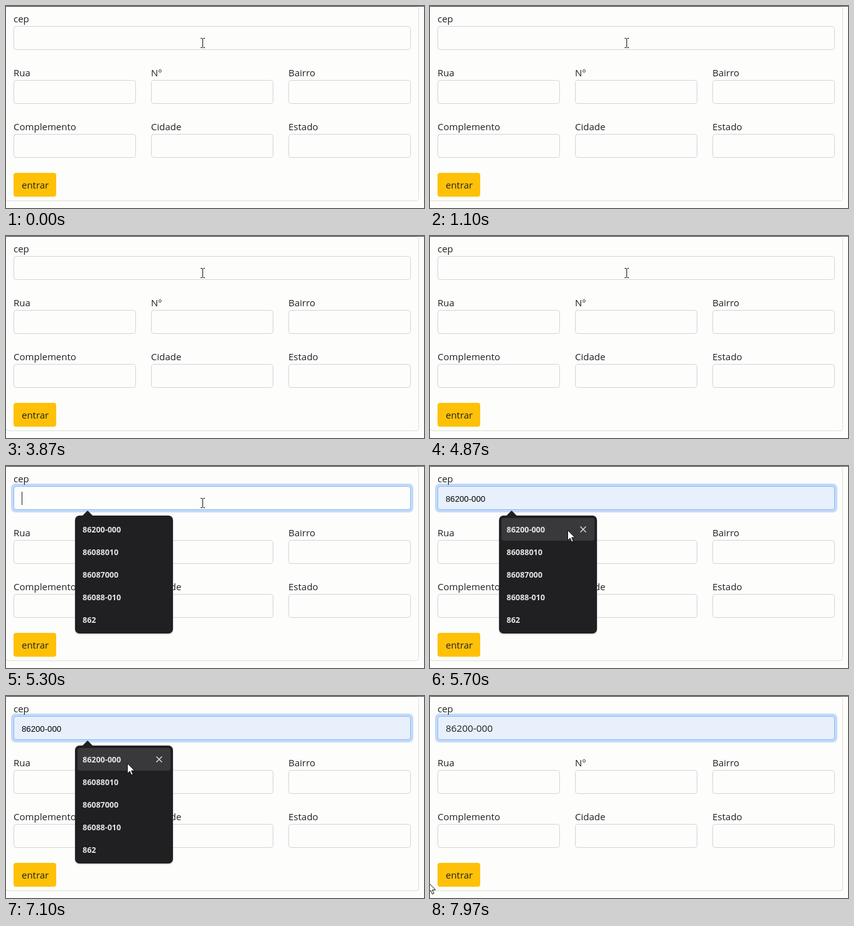
An HTML page that plays this animation: 666x322 px, repeating every 8 s.

```html
<!DOCTYPE html>
<html lang="pt">
<head>
<meta charset="utf-8">
<style>
  html, body { margin: 0; width: 100%; height: 100%; overflow: hidden; background: #fdfdfb; }
  svg { display: block; font: 15px "Open Sans", "Noto Sans", sans-serif; fill: #1e2022; }
  .box { fill: #fdfdfc; stroke: #d2d4da; }
  .card { stroke: #dfdfd6; }
  .ring { fill: #c3dafa; }
  .focus .main { stroke: #8cb8f0; }
  .filled .main { fill: #e7f0fb; }
  #preview { font: 13.2px "Liberation Sans", Arial, sans-serif; fill: #000; }
  #popup { fill: #202022; filter: drop-shadow(0 1px 1px #8888); }
  #popup text { font-size: 12.5px; font-weight: 700; fill: #e6e6e6; }
</style>
</head>
<body>
<svg width="666" height="322" viewBox="0 0 666 322">
  <rect width="666" height="1" fill="#444440"/>
  <rect class="box card" x="-.5" y="1.5" width="658" height="309" rx="4"/>
  <g id="form"></g>
  <rect x="12" y="266" width="68" height="38" rx="4" fill="#ffc107"/>
  <text x="25" y="291">entrar</text>
  <text id="preview" x="25" y="57">86200-000</text>
  <text id="value" x="25" y="57" font-size="15.3">86200-000</text>
  <rect id="caret" x="25" y="41" width="1" height="21"/>
  <g id="popup">
    <path d="M121 80L130 71L139 80Z"/>
    <rect x="110" y="79" width="156" height="188" rx="7"/>
    <g id="hover">
      <rect x="114" y="83" width="148" height="36" rx="4" fill="#39393b"/>
      <path d="M239.5 96.5l9 9m0-9l-9 9" stroke="#d4d4d4" stroke-width="1.5"/>
    </g>
    <g id="items"></g>
  </g>
  <path id="beam" d="M-3 -7.5h2.5l1 1 1-1h2.5M.5 -7v14M-3 7.5h2.5l1-1 1 1h2.5" fill="none" stroke="#111"/>
  <path id="arrow" d="M.5.5V16.5L4.2 13L6.7 18.8L9.2 17.7L6.7 12H11.8Z" fill="#fff" stroke="#111"/>
</svg>
<script>
const el = id => document.getElementById(id);
const LOOP = 8000, FOCUS = 4880, PICK = 7540, RING_FADE = 150, BLINK = 500;

function field(label, x, y, width, main = false) {
  const ring = main
    ? `<rect id="ring" class="ring" x="${x - 4}" y="${y - 4}" width="${width + 8}" height="46" rx="7"/>` : "";
  return `${ring}<text x="${x}" y="${y - 6}">${label}</text>
    <rect class="box ${main ? "main" : ""}" x="${x + .5}" y="${y + .5}" width="${width - 1}" height="37" rx="4"/>`;
}

const rows = [["Rua", "N°", "Bairro"], ["Complemento", "Cidade", "Estado"]];
el("form").innerHTML = field("cep", 12, 32, 633, true) + rows.map((row, r) =>
  row.map((label, c) => field(label, 12 + 219 * c, 118 + 86 * r, 195)).join("")).join("");
el("items").innerHTML = ["86200-000", "86088010", "86087000", "86088-010", "862"]
  .map((code, i) => `<text x="122" y="${106 + 36 * i}">${code}</text>`).join("");

// Pointer stops: time, x, y
const stops = [[0, 313, 59], [5350, 313, 59], [5850, 193, 114], [6350, 193, 114],
  [6900, 193, 107], [7580, 193, 107], [7970, -3, 297], [LOOP, -3, 297]];

function pointer(t) {
  const i = stops.findIndex(stop => stop[0] > t);
  const [a, b] = [stops[i - 1], stops[i]];
  const u = (t - a[0]) / (b[0] - a[0]);
  const ease = u * u * (3 - 2 * u);
  return [1, 2].map(k => Math.round(a[k] + (b[k] - a[k]) * ease));
}

function show(id, on) {
  el(id).style.display = on ? "" : "none";
}

function draw(now) {
  const t = now % LOOP;
  const [x, y] = pointer(t);
  const focused = t >= FOCUS, picked = t >= PICK;
  const overItem = x < 262 && y >= 83;
  const filled = overItem || picked;
  const overField = y < 70;
  const blinkOn = Math.floor((t - FOCUS) / BLINK) % 2 === 0;

  el("form").classList.toggle("focus", focused);
  el("form").classList.toggle("filled", filled);
  el("ring").style.opacity = Math.max(0, Math.min(1, (t - FOCUS) / RING_FADE));
  show("popup", focused && !picked);
  show("hover", overItem);
  show("caret", focused && !filled && blinkOn);
  show("preview", filled && !picked);
  show("value", picked);
  show("beam", overField);
  show("arrow", !overField);
  for (const id of ["beam", "arrow"]) el(id).setAttribute("transform", `translate(${x} ${y})`);
}

const start = performance.now();
function tick() {
  draw(performance.now() - start);
  requestAnimationFrame(tick);
}
tick();
</script>
</body>
</html>
```
